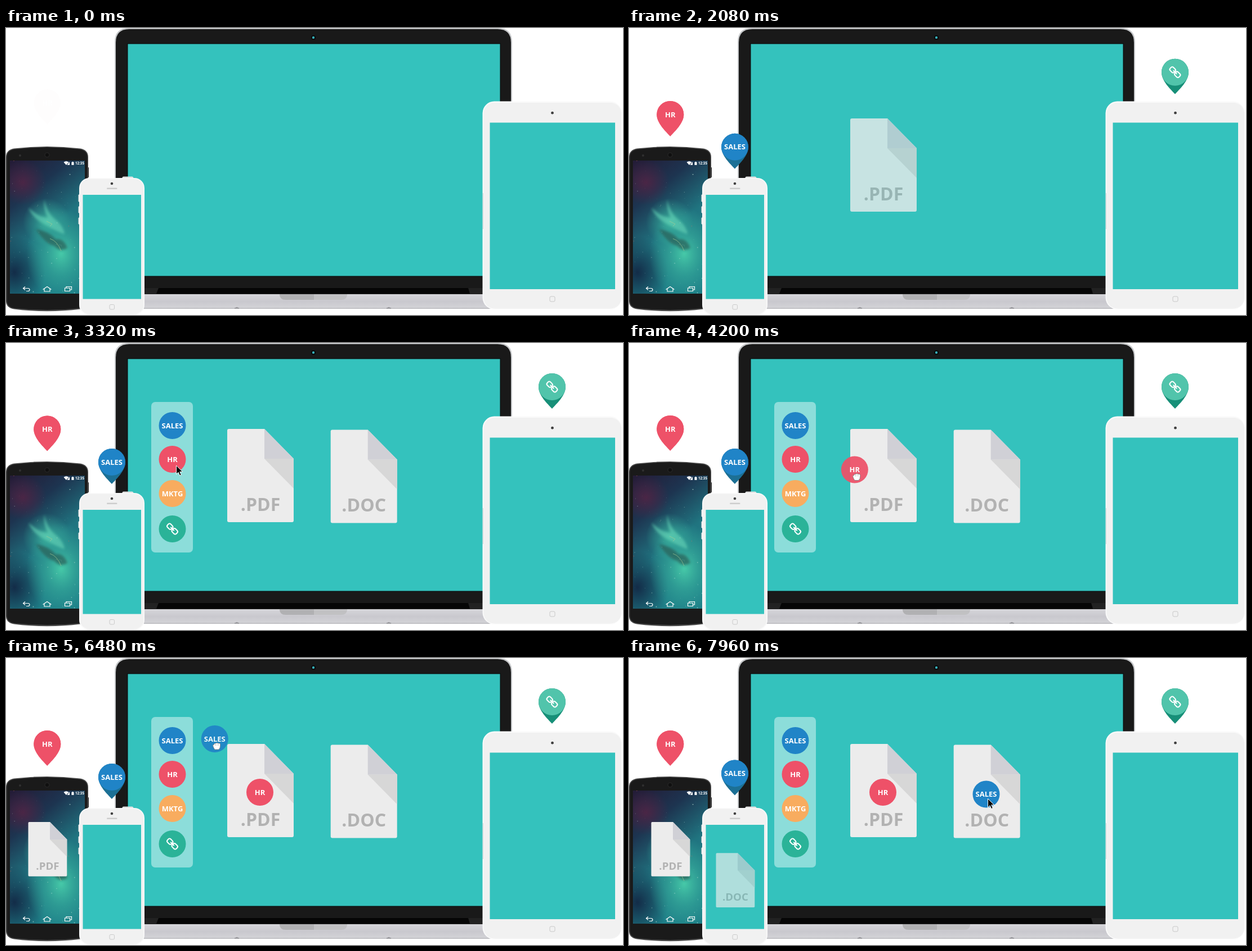
An HTML page for the animation above (8 s loop, 1096x511 px).

```html
<!DOCTYPE html>
<html lang="en">
<head>
<meta charset="utf-8">
<title>Tagged files reach devices</title>
<style>
html, body { margin: 0; width: 100%; height: 100%; overflow: hidden; background: #fff; }
svg { display: block; }
text { font-family: "Open Sans", "Noto Sans", sans-serif; font-weight: 700; text-anchor: middle; }
.label { font-size: 13px; fill: #fff; }
.ext { font-size: 32px; fill: #b2b2b2; }
.line { fill: none; stroke: #fff; }
</style>
</head>
<body>
<svg id="stage" width="1096" height="511" viewBox="0 0 1096 511">
  <defs>
    <linearGradient id="base" x2="0" y2="1">
      <stop offset="0" stop-color="#d6d6da"/><stop offset=".5" stop-color="#c9c8ce"/>
      <stop offset=".9" stop-color="#d2d2d6"/><stop offset="1" stop-color="#b4b4b8"/>
    </linearGradient>
    <linearGradient id="sky" x2=".45" y2="1">
      <stop offset="0" stop-color="#241b36"/><stop offset=".3" stop-color="#1d3450"/>
      <stop offset=".62" stop-color="#207480"/><stop offset="1" stop-color="#1e7f88"/>
    </linearGradient>
    <radialGradient id="glow">
      <stop offset="0" stop-color="#46c9a8"/><stop offset=".5" stop-color="#36ab9b" stop-opacity=".6"/>
      <stop offset="1" stop-color="#36ab9b" stop-opacity="0"/>
    </radialGradient>
    <radialGradient id="shade">
      <stop offset="0" stop-color="#132c48"/><stop offset="1" stop-color="#132c48" stop-opacity="0"/>
    </radialGradient>
    <radialGradient id="plum">
      <stop offset="0" stop-color="#552445" stop-opacity=".8"/><stop offset="1" stop-color="#552445" stop-opacity="0"/>
    </radialGradient>
    <filter id="soft"><feGaussianBlur stdDeviation="2.2"/></filter>
    <clipPath id="phoneScreen"><rect x="7" y="236" width="133" height="237"/></clipPath>
  </defs>

  <g id="laptop">
    <path d="M193 480V25Q193 0 218 0H874Q899 0 899 25V480Z" fill="#c6c8ca"/>
    <path d="M195 474V26Q195 2 219 2H873Q897 2 897 26V474Z" fill="#191919"/>
    <rect x="215" y="27" width="664" height="416" fill="#0d1010"/>
    <rect x="216.500" y="28.500" width="661" height="413" fill="#34c2bd"/>
    <circle cx="546" cy="17" r="4" fill="#08090a"/>
    <circle cx="546" cy="17" r="2.200" fill="#37aeb8"/>
    <path d="M195 463H897V474H195Z" fill="#222"/>
    <path d="M271 463H821L824 473H267Z" fill="#060606"/>
    <path d="M200 474H890V500H200Z" fill="url(#base)"/>
    <path d="M486 474H547V484H497Q486 484 486 474Z" fill="#b1b1b3"/>
    <path d="M547 474H606Q606 484 595 484H547Z" fill="#c1c1c3"/>
    <path d="M406 499Q410 496 414 499ZM676 499Q680 496 684 499Z" fill="#929296" stroke="#929296"/>
  </g>

  <g id="darkPhone">
    <rect x="144" y="248" width="3" height="18" rx="1" fill="#222"/>
    <path d="M0 230Q0 217 14 214.500Q73 207.500 132 214.500Q146 217 146 230V486Q146 498 132 500.500Q73 508 14 500.500Q0 498 0 486Z" fill="#4b4b4b"/>
    <path d="M1.500 230Q1.500 218 15 216Q73 209 131 216Q144.500 218 144.500 230V485Q144.500 497 131 499Q73 505 15 499Q1.500 497 1.500 485Z" fill="#1a1a1a"/>
    <circle cx="73" cy="226" r="4" fill="#101010" stroke="#292929"/>
    <circle cx="25" cy="227" r="2" fill="#303030"/>
    <g clip-path="url(#phoneScreen)">
      <rect x="7" y="236" width="133" height="237" fill="url(#sky)"/>
      <ellipse cx="30" cy="275" rx="42" ry="40" fill="url(#plum)"/>
      <ellipse cx="15" cy="435" rx="55" ry="65" fill="url(#shade)"/>
      <ellipse cx="98" cy="402" rx="62" ry="82" fill="url(#glow)"/>
      <ellipse cx="72" cy="345" rx="42" ry="42" fill="url(#glow)" opacity=".75"/>
      <g filter="url(#soft)">
        <path d="M68 305Q72 330 90 343Q102 353 104 367Q88 362 70 350Q48 340 40 320Q58 337 74 338Q66 322 68 305Z" fill="#62d0b4" opacity=".65"/>
        <path d="M53 358Q76 362 88 376Q103 374 109 392Q95 400 86 388Q69 384 53 358Z" fill="#285e58" opacity=".7"/>
      </g>
      <path d="M72 344L82 349L78 353M78 375Q91 379 98 397" fill="none" stroke="#a5c994" opacity=".65"/>
      <g id="stars" fill="#c5e8dc"></g>
    </g>
    <path d="M102.500 239Q107 235.500 111.500 239L107 244ZM113 244H108.500L113 238ZM116.500 239H120.500V244H116.500ZM117.500 238H119.500V239H117.500Z" fill="#fff"/>
    <text x="131" y="243.200" font-size="6.200" fill="#fff">12:35</text>
    <g class="line" stroke-width="1.200">
      <path d="M34 460.500L30.500 463.500L34 466.500M31 463.500H39Q42 463.500 42 466T39 468.500H36"/>
      <path d="M66.500 465L73 460.500L79.500 465H78V469H68V465Z"/>
      <path d="M104.500 463H113.500V468.500H104.500ZM107 463V460.500H116.500V466H113.500"/>
    </g>
  </g>

  <g id="whitePhone">
    <path d="M207 268V266Q207 265 209 265H224Q226 265 226 267V268ZM131 297H129V309H131ZM131 318H129V329H131ZM131 338H129V349H131Z" fill="#e4e4e4" stroke="#e4e4e4"/>
    <rect x="130" y="267" width="116" height="244" rx="18" fill="#fafafa"/>
    <rect x="131.500" y="268.500" width="113" height="241" rx="17" fill="#f1f1f1"/>
    <rect x="136.500" y="297" width="103.500" height="185.500" fill="#34c2bd"/>
    <circle cx="188" cy="277" r="2.300" fill="#414141"/>
    <rect x="179" y="284.500" width="18.500" height="2.500" rx="1.200" fill="#cdcdcd"/>
    <rect x="184" y="492.500" width="8.500" height="8.500" rx="2" fill="none" stroke="#cacaca"/>
  </g>

  <g id="tablet">
    <rect x="846.500" y="130.500" width="247.500" height="370.500" rx="21" fill="#fafafa"/>
    <path d="M847.500 294V358" stroke="#d5d5d5"/>
    <rect x="848.500" y="133" width="244.500" height="366.500" rx="19" fill="#f1f1f1"/>
    <rect x="859.500" y="168.500" width="222.500" height="296.500" fill="#34c2bd"/>
    <circle cx="970.500" cy="151.200" r="2.400" fill="#3e3e3e"/>
    <rect x="966" y="478" width="9" height="9" rx="2" fill="none" stroke="#c8c8c8"/>
  </g>
</svg>
<script>
const stage = document.getElementById('stage');
const COLORS = { SALES: '#2084c7', HR: '#ee5168', MKTG: '#f8ac5f', link: '#2ab398' };
const CENTERS = { SALES: 147, HR: 207, MKTG: 268, link: 331 };

const linkIcon = `<g class="line" stroke-width="2" transform="rotate(45)">
  <rect x="-11" y="-4" width="10" height="8" rx="3"/><rect x="1" y="-4" width="10" height="8" rx="3"/>
  <path d="M-4.500 0H4.500"/></g>`;
const label = name => name === 'link' ? linkIcon : `<text class="label" y="4.600">${name}</text>`;
const disc = (name, color = COLORS[name]) => `<circle r="24" fill="${color}"/>${label(name)}`;
const pin = (name, tail, color) => `
  <path d="M-24 24A24 24 0 0 1 24 24C24 40 8 54 0 63C-8 54-24 40-24 24Z" fill="${tail}"/>
  <g transform="translate(0 24)">${disc(name, color)}</g>`;
const sheet = ext => `
  <path d="M3 0H66L118 53V163Q118 166 115 166H3Q0 166 0 163V3Q0 0 3 0Z" fill="#ececec"/>
  <path d="M66 53H118V106Z" fill="#d7d7d7"/><path d="M66 0V53H118Z" fill="#d0d0d6"/>
  <text class="ext" x="59" y="145.800">.${ext}</text>`;

function add(content) {
  const g = document.createElementNS('http://www.w3.org/2000/svg', 'g');
  g.innerHTML = content;
  stage.append(g);
  return g;
}
function place(g, x, y, opacity = 1, scale = 1) {
  g.setAttribute('transform', `translate(${x} ${y}) scale(${scale})`);
  g.setAttribute('opacity', opacity);
}

let seed = 7;
const random = () => (seed = seed * 16807 % 2147483647) / 2147483647;
document.getElementById('stars').innerHTML = Array.from({ length: 130 }, () =>
  `<circle cx="${7 + random() * 133}" cy="${236 + random() * 237}" r="${.2 + random() ** 4 * .8}"
    opacity="${.25 + random() * .5}" ${random() < .15 ? 'fill="#d66c5c"' : ''}/>`).join('');

const pdf = add(sheet('PDF')), doc = add(sheet('DOC'));
const phonePdf = add(sheet('PDF')), phoneDoc = add(sheet('DOC'));
const pinHr = add(pin('HR', COLORS.HR));
const pinSales = add(pin('SALES', '#1c7095'));
const pinLink = add(pin('link', '#178f78', '#51c4ab'));
const panel = add('<rect x="258" y="105" width="74" height="268" rx="7" fill="#fff" opacity=".43"/>' +
  Object.keys(CENTERS).map(n => `<g transform="translate(295.500 ${CENTERS[n]})">${disc(n)}</g>`).join(''));
const tagHr = add(disc('HR')), tagSales = add(disc('SALES'));
const arrow = add('<path d="M0 0V15.500L3.600 12.200L6.200 18L8.800 16.800L6.300 11.200H11.200Z" fill="#000" stroke="#fff"/>');
const hand = add(`<path d="M-6 1Q-7-2-4-2Q-4-5-1-4Q1-6 3-4Q7-5 7-1Q7 5 4 7H-3Q-5 4-6 1Z"
  fill="#fff" stroke="#777" stroke-width=".8"/><path d="M-1-3V0M3-3V0" stroke="#999" stroke-width=".8"/>`);

const ramp = (t, start, length) => Math.min(1, Math.max(0, (t - start) / length));
const sine = u => (1 - Math.cos(Math.PI * u)) / 2;
const glide = u => (u + sine(u)) / 2;
const easeOut = u => 1 - (1 - u) ** 3;
const lerp = (a, b, p) => a + (b - a) * p;

// Pins drop in on a loose spring and hop when a file arrives.
function drop(t, start) {
  const s = Math.max(0, t - start) / 1000;
  return -20 * Math.exp(-2.3 * s) * Math.cos(6.5 * s);
}
function hop(t, start) {
  const s = Math.max(0, t - start) / 1000;
  return -10.5 * Math.exp(-3.2 * s) * Math.sin(10 * s);
}
function showPin(g, x, y, t, start) {
  place(g, x, y + drop(t, start), ramp(t, start, 260));
}
function showSheet(g, x, y, t, start) {
  const p = easeOut(ramp(t, start, 870));
  place(g, x, y + 40 * (1 - p), p);
}
function receive(g, x, y, t, start) {
  place(g, x, y + 25 * (1 - sine(ramp(t, start, 800))), ramp(t, start, 210), .583);
}

const drags = [
  { g: tagHr, start: 3400, length: 1250, from: [295.5, 207], to: [451, 239], bend: 14.4 },
  { g: tagSales, start: 6100, length: 1400, from: [295.5, 147], to: [634.5, 242.5], bend: 140 }
];
function dragPoint({ start, length, from, to, bend }, t) {
  const p = glide(ramp(t, start, length));
  return [lerp(from[0], to[0], p), lerp(from[1], to[1], p) - bend * p * (1 - p)];
}

function moveCursor(t) {
  let holding = false, x, y;
  for (const d of drags) {
    const [dx, dy] = dragPoint(d, t);
    const active = t >= d.start && t < d.start + d.length;
    place(d.g, dx, dy, t < d.start ? 0 : active ? .93 : 1);
    holding ||= active;
    if (t >= d.start) [x, y] = [dx, dy];
  }
  if (t < 3400) {
    const p = sine(ramp(t, 2800, 580));
    [x, y] = [lerp(454, 295.5, p), lerp(330, 207, p)];
  } else if (t >= 5600 && t < 6100) {
    const p = sine(ramp(t, 5600, 480));
    [x, y] = [lerp(451, 295.5, p), lerp(239, 147, p)];
  }
  place(arrow, x + 3, y + 8, holding ? 0 : ramp(t, 2800, 160));
  place(hand, x + 3, y + 12, holding ? 1 : 0);
}

function draw() {
  const t = performance.now() % 8000;
  const drift = 2 * Math.min(ramp(t, 1400, 1200), 1 - ramp(t, 3000, 400));
  showPin(pinHr, 73.3, 129 + drift + hop(t, 4900), t, 0);
  showPin(pinSales, 188, 188 + hop(t, 7820), t, 330);
  showPin(pinLink, 970, 54, t, 650);
  showSheet(pdf, 393, 153, t, 1720);
  showSheet(doc, 576.7, 154.5, t, 2120);
  receive(phonePdf, 39.5, 292, t, 4940);
  receive(phoneDoc, 154.5, 324, t, 7820);
  place(panel, -12 * (1 - easeOut(ramp(t, 2720, 500))), 0, ramp(t, 2720, 400));
  moveCursor(t);
  requestAnimationFrame(draw);
}
draw();
</script>
</body>
</html>
```
